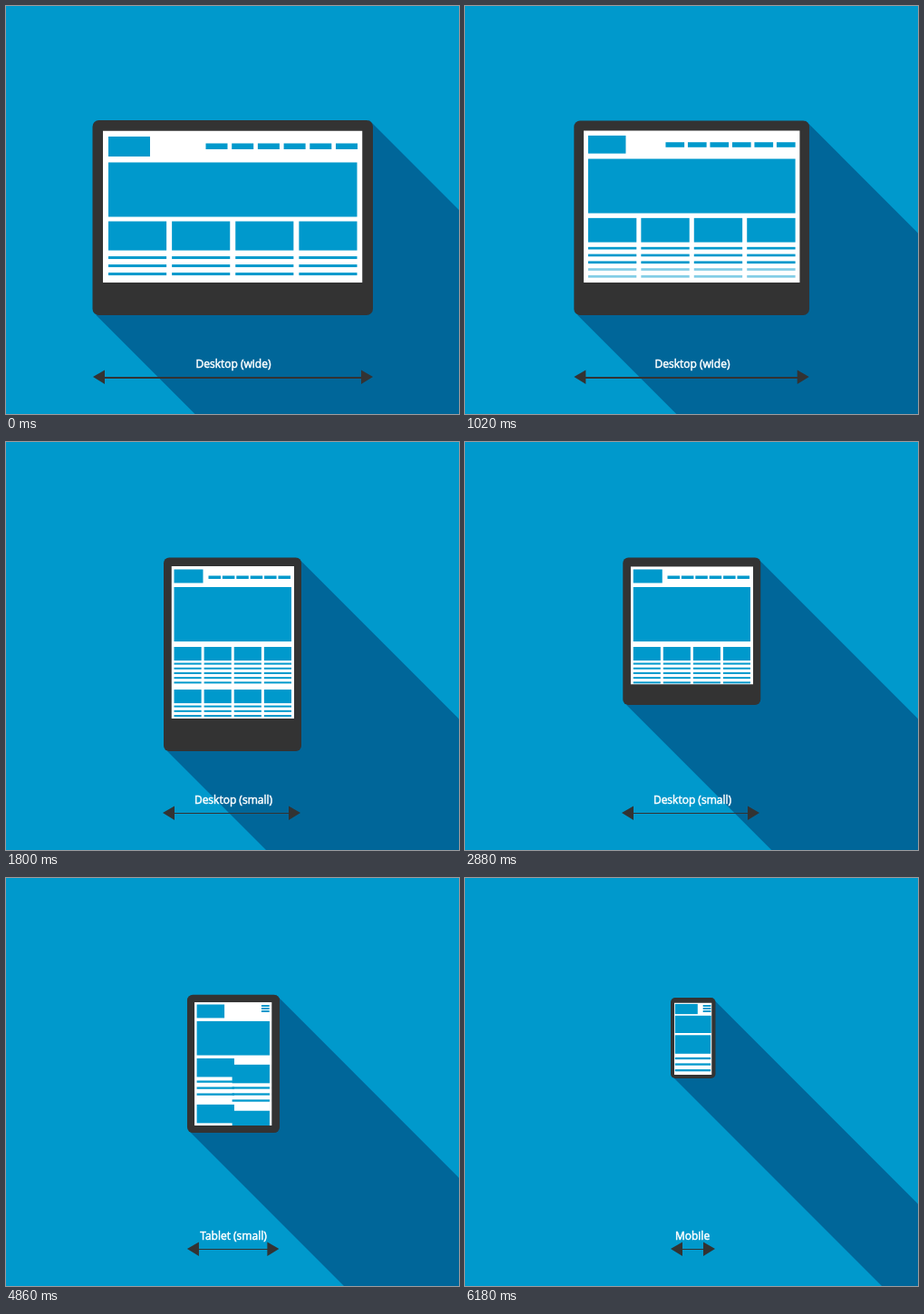
Animation, 500 px wide and 450 px high, one loop 6900 ms. Source, as an HTML page with a canvas:

```html
<!DOCTYPE html>
<html lang="en">
<head>
<meta charset="utf-8">
<title>Responsive layout</title>
<style>
  html, body { margin: 0; width: 100%; height: 100%; overflow: hidden; background: #09c; }
  canvas { position: absolute; left: 0; top: 0; }
  #label {
    position: absolute; left: 151px; top: 387px; width: 200px;
    font: 12px/16px "Open Sans", "Noto Sans", sans-serif;
    color: #fff; -webkit-text-stroke: 0.5px #fff;
    text-align: center; white-space: nowrap;
  }
</style>
</head>
<body>
<canvas id="stage" width="500" height="450"></canvas>
<div id="label"></div>
<script>
const LOOP = 6900, STEP = 60;
const BLUE = '#0099cc', SHADE = '#006699', DARK = '#333333';
const ctx = document.getElementById('stage').getContext('2d');
const label = document.getElementById('label');

// Edges as left, top, right, bottom: body, then screen; last the corner radius.
const WIDE = [95.5, 126, 405, 341, 107, 137.5, 393.5, 305, 7];
const SMALL = [174, 127.5, 326, 341, 182.5, 137, 318, 305, 6];
const LAND = [174.5, 127.5, 326.5, 239, 183, 137.5, 318, 230, 6];
const PORT = [195.2, 128.2, 306.8, 281, 203.8, 137, 297.4, 272.5, 6.5];
const TALL = [226.2, 132, 276, 281, 231.3, 137.3, 272.3, 276.4, 5];
const PHONE = [227, 132, 276.5, 221, 231, 137.5, 272.5, 217, 5];

const MOVES = [
  [660, 1800, WIDE, SMALL],
  [2760, 3000, SMALL, LAND],
  [4200, 4200, LAND, PORT],
  [4740, 5520, PORT, TALL],
  [5880, 6180, TALL, PHONE]
];
const LABELS = [
  [0, 'Desktop (wide)'], [1380, 'Desktop (small)'], [2940, 'Tablet (wide)'],
  [4080, 'Tablet (small)'], [5460, 'Mobile']
];
const ARROWS = [
  [660, 96, 405], [1800, 173, 325], [3900, 173, 325],
  [4200, 195, 306], [4740, 195, 306], [5520, 227, 276]
];

const mix = (a, b, p) => a + (b - a) * p;
const clamp = v => Math.max(0, Math.min(1, v));
const phase = (t, from, to) => to > from ? clamp((t - from) / (to - from)) : +(t >= to);

function poseAt(t) {
  let pose = WIDE;
  for (const [from, to, a, b] of MOVES) {
    if (t >= from) pose = a.map((v, i) => mix(v, b[i], phase(t, from, to)));
  }
  return pose;
}

function box(l, t, r, b, color = BLUE) {
  ctx.fillStyle = color;
  ctx.fillRect(l, t, r - l, b - t);
}

function polygon(points, color) {
  ctx.fillStyle = color;
  ctx.beginPath();
  points.forEach(([x, y]) => ctx.lineTo(x, y));
  ctx.fill();
}

function lines(x, y, w, count, step, thick) {
  for (let i = 0; i < count; i++) box(x, y + i * step, x + w, y + i * step + thick);
}

// Four columns with a full menu.
function desktopPage(l, r, p) {
  const at = (a, b) => mix(a, b, p);
  const pad = at(6, 3), logoY = at(144, 140.5), heroY = at(172.5, 160);
  box(l + pad, logoY, l + pad + at(46, 32), logoY + at(22, 15));
  for (let i = 0; i < 6; i++) {
    const x = at(220.5, 223.5) + i * at(28.7, 15.4), y = at(151.5, 147.5);
    box(x, y, x + at(24, 13.5), y + at(6.5, 3.5));
  }
  box(l + pad, heroY, r - pad, heroY + 60);

  const w = (r - l - 5 * pad) / 4, h = w / 2;
  const gap = at(6.5, 2.5), step = at(9, 5.2), thick = at(3, 2);
  const rowH = h + gap + 5 * step + at(8, 3.5);
  for (let row = 0; row < 2; row++) {
    const y = at(237.5, 226) + row * rowH;
    for (let col = 0; col < 4; col++) {
      const x = l + pad + col * (w + pad);
      box(x, y, x + w, y + h);
      lines(x, y + h + gap, w, 3, step, thick);
      ctx.globalAlpha = clamp((286 - (r - l)) / 96);
      lines(x, y + h + gap + 3 * step, w, 2, step, thick);
      ctx.globalAlpha = 1;
    }
  }
}

// Two columns; the right one slides down until everything is stacked.
function compactPage(l, r, p) {
  const at = (a, b) => mix(a, b, p);
  const pad = at(2.9, 0.8), logoY = at(139.6, 138.9);
  box(l + pad, logoY, l + pad + at(31.5, 25), logoY + at(15.6, 11.2));
  lines(r - pad - 9, 140, 8.7, 3, 3, 2);
  box(l + pad, at(159, 151.8), r - pad, at(200, 171));

  const w = at(41.7, 39.4), h = 20.5, drop = at(0, 44.8), step = at(7.1, 6.6);
  const card = (x, y) => {
    box(x, y, x + w, y + h);
    lines(x, y + h + 4, w, 3, step, 2.3);
  };
  for (let row = 0; row < 2; row++) {
    const y = at(203.6, 173.3) + row * (drop + 44);
    card(l + pad, y);
    card(r - pad - w, y + drop);
  }
}

function device(pose, t) {
  const [L, T, R, B, l, top, r, b, radius] = pose;
  ctx.fillStyle = DARK;
  ctx.beginPath();
  ctx.roundRect(L, T, R - L, B - T, radius);
  ctx.fill();
  ctx.beginPath();
  ctx.rect(l, top, r - l, b - top);
  ctx.clip();
  box(l, top, r, b, '#fff');
  if (t < 4200) desktopPage(l, r, phase(t, 660, 1800));
  else compactPage(l, r, phase(t, 4740, 5520));
}

function shadow(corners) {
  const sorted = corners.sort((a, b) => (a[0] - a[1]) - (b[0] - b[1]));
  const [x0, y0] = sorted[0], [x1, y1] = sorted[3];
  polygon([[x0 + 4, y0], [x0 + 604, y0 + 600], [x1 + 596, y1 + 600], [x1 - 4, y1]], SHADE);
}

function arrow(t) {
  let [, a, b] = ARROWS[0];
  for (let i = 1; i < ARROWS.length; i++) {
    const p = phase(t, ARROWS[i - 1][0], ARROWS[i][0]);
    a = mix(a, ARROWS[i][1], p);
    b = mix(b, ARROWS[i][2], p);
  }
  box(a + 10, 409, b - 10, t < 1380 ? 411 : 410, DARK);
  polygon([[a, 409], [a + 13, 401.5], [a + 13, 417]], DARK);
  polygon([[b, 409], [b - 13, 401.5], [b - 13, 417]], DARK);
}

function draw(t) {
  const pose = poseAt(t), [L, T, R, B] = pose;
  const turn = t < 4200 ? phase(t, 3900, 4200) : 0;
  const angle = turn * Math.PI / 2, cos = Math.cos(angle), sin = Math.sin(angle);
  const cx = (L + R) / 2, cy = (T + B) / 2;
  const dx = turn * 0.5, dy = turn * 21.3;
  const spin = ([x, y]) => [
    cx + dx + (x - cx) * cos - (y - cy) * sin,
    cy + dy + (x - cx) * sin + (y - cy) * cos
  ];

  box(0, 0, 500, 450);
  shadow([[L, T], [R, T], [R, B], [L, B]].map(spin));
  ctx.save();
  ctx.translate(cx + dx, cy + dy);
  ctx.rotate(angle);
  ctx.translate(-cx, -cy);
  device(pose, t);
  ctx.restore();
  arrow(t);

  const text = LABELS.filter(([from]) => t >= from).pop()[1];
  if (label.textContent !== text) label.textContent = text;
}

const start = performance.now();
function tick() {
  const t = (performance.now() - start) % LOOP;
  draw(Math.floor(t / STEP) * STEP);
  requestAnimationFrame(tick);
}
tick();
</script>
</body>
</html>
```
